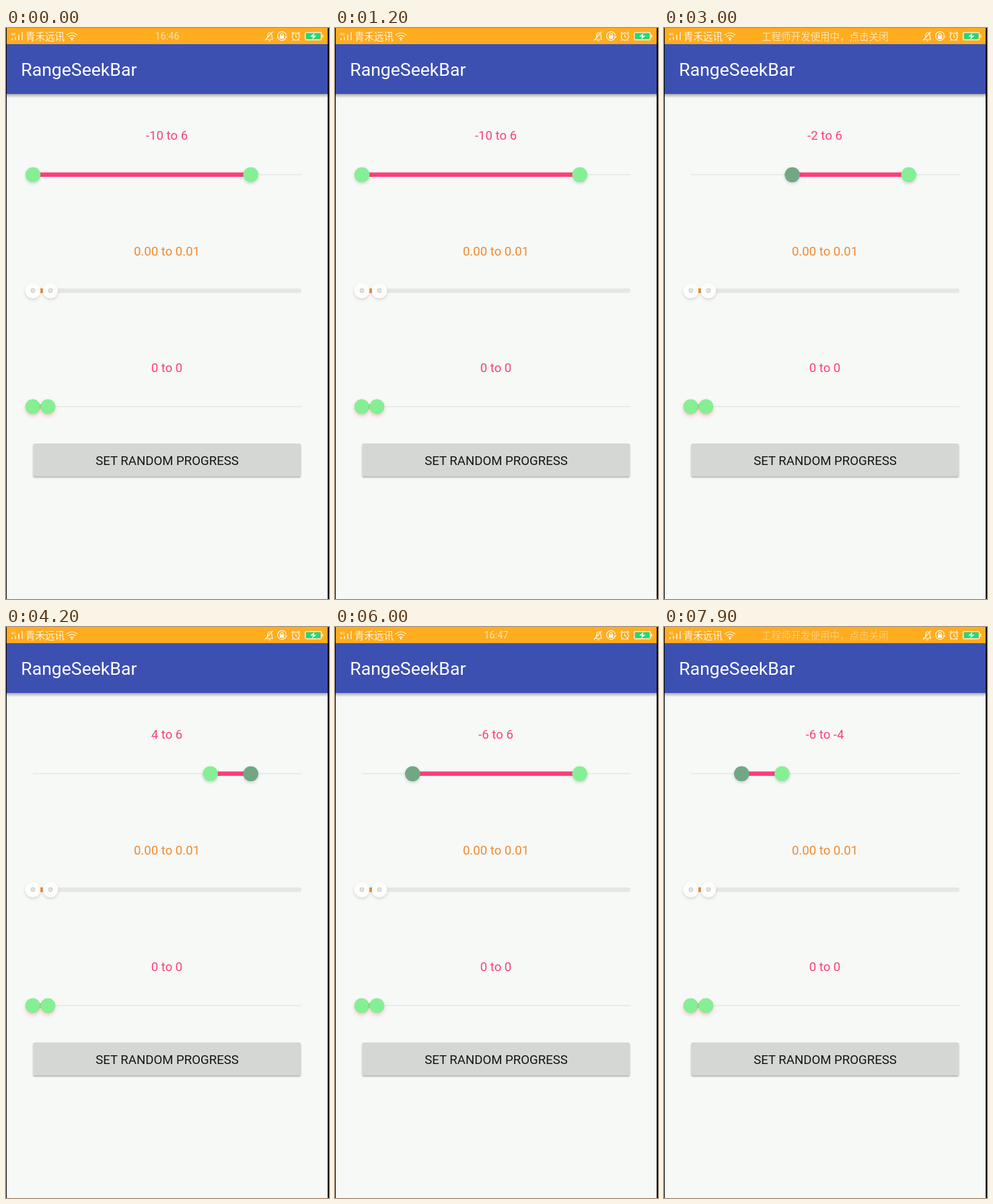
An HTML page for the animation above (8 s loop, 480 px wide and 848 px high).

```html
<!DOCTYPE html>
<html lang="en">
<head>
<meta charset="utf-8">
<title>RangeSeekBar</title>
<style>
html, body { margin: 0; width: 100%; height: 100%; overflow: hidden; background: #000; }
svg { display: block; width: 480px; height: 848px; }
text { font-family: Roboto, "Noto Sans CJK SC", sans-serif; }
.value { font-size: 18.6px; text-anchor: middle; }
.status { font-size: 14.5px; fill: #fff; }
.cjk { font-family: "Noto Sans CJK SC", "Noto Sans CJK", sans-serif; font-weight: 300; }
.icons { fill: none; stroke: #fff; stroke-opacity: .88; stroke-width: 1.2; }
.pink { fill: #fc3f7b; }
.orange { fill: #f08a30; }
.rail { fill: #e5e7e5; }
.knob { fill: #86ef96; filter: url(#soft); }
.knob.down { fill: #73a784; }
.rosy { filter: url(#rosy); }
#clock { animation: clock 8s linear infinite; }
#notice { animation: notice 8s linear infinite; }
@keyframes clock {
  0%, 9.5% { opacity: .65; }
  15%, 54.5% { opacity: 0; }
  61%, 84.5% { opacity: .7; }
  90%, 100% { opacity: 0; }
}
@keyframes notice {
  0%, 19.5% { opacity: 0; }
  26%, 48% { opacity: .66; }
  52.5%, 95% { opacity: 0; }
  100% { opacity: .5; }
}
</style>
</head>
<body>
<svg viewBox="0 0 480 848">
  <defs>
    <filter id="soft" x="-50%" y="-50%" width="200%" height="200%">
      <feDropShadow dx="0" dy="2" stdDeviation="2.2" flood-color="#000" flood-opacity=".16"/>
    </filter>
    <filter id="rosy" x="-50%" y="-50%" width="200%" height="200%">
      <feDropShadow dx="0" dy="3" stdDeviation="2.4" flood-color="#ff5068" flood-opacity=".3"/>
    </filter>
    <filter id="lift" x="-5%" y="-20%" width="110%" height="150%">
      <feDropShadow dx="0" dy="2" stdDeviation="1.3" flood-color="#000" flood-opacity=".32"/>
    </filter>
    <linearGradient id="shade" x2="0" y2="1">
      <stop stop-color="#000" stop-opacity=".3"/>
      <stop offset="1" stop-color="#000" stop-opacity="0"/>
    </linearGradient>
  </defs>

  <rect x="1" width="477" height="848" fill="#f7f9f7"/>
  <rect x="1" y="98" width="477" height="6" fill="url(#shade)"/>
  <rect x="1" y="24" width="477" height="74" fill="#3c50b2"/>
  <rect x="1" width="477" height="24" fill="#ffac1f"/>

  <!-- status bar -->
  <text class="status cjk" x="29" y="17.5" opacity=".9">青禾远讯</text>
  <text class="status" id="clock" x="239.5" y="17.3" text-anchor="middle">16:46</text>
  <text class="status cjk" id="notice" x="145" y="17.5">工程师开发使用中，点击关闭</text>
  <text x="7" y="10.5" font-size="6" fill="#fff">4G</text>
  <g class="icons">
    <path d="M9 18v-3M14 18v-5M19 18v-8M24 18V6" stroke-width="1.5"/>
    <path d="M90 10.5q8-7 16 0M92.8 13.2q5.200-4.600 10.400 0M95.500 15.800q2.500-2.200 5 0"/>
    <circle cx="98" cy="17.300" r=".8" fill="#fff"/>
    <path d="M385 17h11.500M386.500 17q2.500-2 2.500-6 0-4 3-4 3 0 3 4 0 4 1.500 6M390 19h3M396.500 5.500L385 18.500"/>
    <path d="M416.200 14A6.500 6.500 0 1 1 416.500 11M414.500 12l2 2 1.500-2"/>
    <path d="M408 11.500v-1.300a2 2 0 0 1 4 0v1.300"/>
    <rect x="407.500" y="11.500" width="5" height="4" fill="#fff"/>
    <circle cx="430.700" cy="12.800" r="5.400"/>
    <path d="M430.700 9.500v3.700l2.500 1M424.300 8.500l3-2.700M437 8.500l-3-2.700M427 17l-1.500 1.800M434.500 17l1.500 1.800"/>
    <rect x="444.600" y="6.600" width="24" height="11" rx="1.500"/>
    <path d="M470.500 10v4.500" stroke-width="1.500"/>
  </g>
  <rect x="446" y="8" width="21.200" height="8.200" fill="#16dc80"/>
  <path d="M458.500 7.500l-6.500 5.200h4.200l-1.400 4.200 6.700-5.400h-4.300z" fill="#fff"/>

  <text x="22.300" y="71" font-size="26.600" fill="#fff">RangeSeekBar</text>

  <!-- integer range -->
  <text class="value pink" id="range" x="239" y="166">-10 to 6</text>
  <rect class="rail" x="40" y="217" width="399" height="1.500"/>
  <rect class="pink" id="span" x="40" y="214.500" width="324" height="6.600"/>
  <circle class="knob" id="low" cx="40" cy="218" r="11.300"/>
  <circle class="knob" id="high" cx="364" cy="218" r="11.300"/>

  <!-- decimal range -->
  <text class="value orange" x="239" y="338">0.00 to 0.01</text>
  <rect class="rail" x="37" y="386.800" width="402" height="6.600" rx="3.300"/>
  <rect class="orange" x="40" y="386.800" width="26" height="6.600"/>
  <g fill="#fdfdfc" filter="url(#soft)">
    <circle cx="40" cy="390" r="11.200"/>
    <circle cx="66" cy="390" r="11.200"/>
  </g>
  <g fill="#e6e6e4" stroke="#d2d3d1" stroke-width="1.500">
    <circle cx="40" cy="390" r="2.700"/>
    <circle cx="66" cy="390" r="2.700"/>
  </g>

  <!-- idle range -->
  <text class="value pink" x="239" y="510.500">0 to 0</text>
  <rect class="rail" x="40" y="561.500" width="399" height="1.500"/>
  <rect x="40" y="559" width="22" height="6.600" fill="#c5695f"/>
  <circle class="knob rosy" cx="39.700" cy="562.500" r="11.200"/>
  <circle class="knob rosy" cx="62.300" cy="562.500" r="11.200"/>

  <rect x="40.500" y="617" width="397.500" height="48.500" rx="2" fill="#d5d7d4" filter="url(#lift)"/>
  <text class="value" x="239.500" y="648.500" fill="#141414">SET RANDOM PROGRESS</text>
</svg>
<script>
const $ = id => document.getElementById(id);
const LOOP = 8000, STEP = 18.83, LOW_X = 40, HIGH_X = 62.5;

// [time, low, high, pressed knob]
const drag = [
  [0, -10, 6, ''], [2000, -10, 6, 'low'], [2200, -8, 6, 'low'],
  [2400, -6, 6, 'low'], [2700, -4, 6, 'low'], [2900, -2, 6, 'low'],
  [3200, 0, 6, 'low'], [3500, 2, 6, 'low'], [3700, 4, 6, 'low'],
  [3900, 4, 6, ''], [4100, 4, 6, 'high'], [4400, 4, 6, ''],
  [4500, 4, 6, 'low'], [4600, 2, 6, 'low'], [4700, 0, 6, 'low'],
  [4900, -2, 6, 'low'], [5100, -4, 6, 'low'], [5300, -6, 6, 'low'],
  [5600, -8, 6, 'low'], [5900, -6, 6, 'low'], [6800, -6, 6, ''],
  [6900, -6, 6, 'high'], [7000, -6, 4, 'high'], [7100, -6, 2, 'high'],
  [7200, -6, 0, 'high'], [7300, -6, -2, 'high'], [7400, -6, -4, 'high'],
  [7600, -6, -4, ''], [7700, -6, -4, 'low']
];

let start, shown;

function show([, low, high, pressed]) {
  const a = LOW_X + (low + 10) * STEP;
  const b = HIGH_X + (high + 10) * STEP;
  $('low').setAttribute('cx', a);
  $('high').setAttribute('cx', b);
  $('span').setAttribute('x', a);
  $('span').setAttribute('width', b - a);
  $('range').textContent = `${low} to ${high}`;
  for (const id of ['low', 'high']) $(id).classList.toggle('down', id === pressed);
}

function tick(now) {
  start ??= now;
  const t = (now - start) % LOOP;
  const state = drag.findLast(s => s[0] <= t) || drag[0];
  if (state !== shown) show(shown = state);
  $('clock').textContent = t < 5600 ? '16:46' : '16:47';
  requestAnimationFrame(tick);
}
requestAnimationFrame(tick);
</script>
</body>
</html>
```
